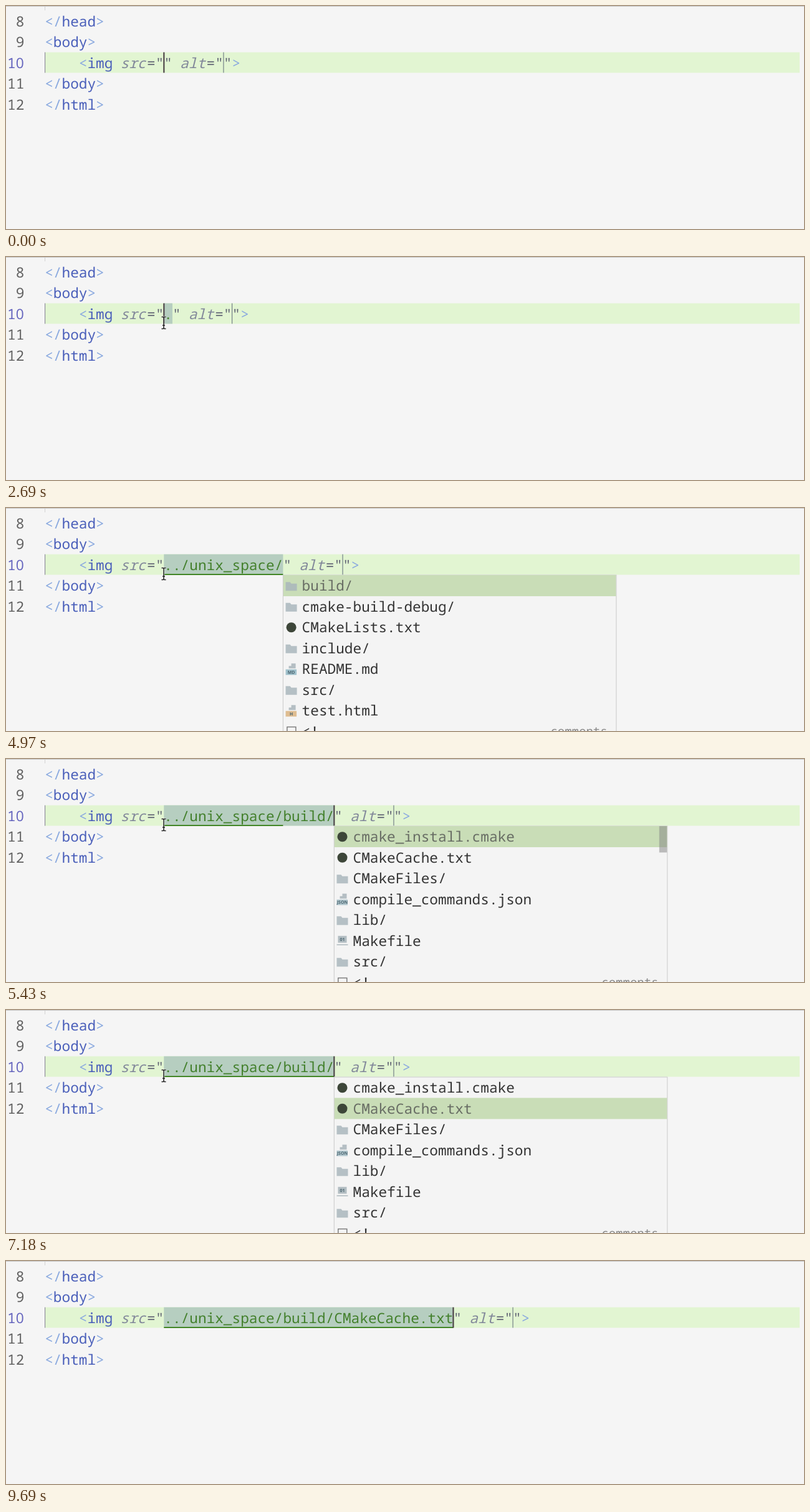
Write an HTML page that moves like this. It is 1280 px wide and 359 px high and loops after 9750 ms.

```html
<!DOCTYPE html>
<html lang="en">
<head>
<meta charset="utf-8">
<title>Path completion</title>
<style>
  html, body { margin: 0; width: 100%; height: 100%; overflow: hidden; background: #f5f5f5; }
  svg { display: block; width: 1280px; height: 359px; }
  text { font: 22.75px "Noto Sans Mono", monospace; white-space: pre; text-rendering: geometricPrecision; }
  .bracket { fill: #8aa9df; }
  .tag { fill: #4a5fba; }
  .attr { fill: #82889a; font-style: italic; }
  .mark { fill: #646876; }
  .path { fill: #43802c; }
  .number { fill: #626262; }
  .current { fill: #6363bd; }
  .zero { font-family: "Open Sans", sans-serif; }
  .item { fill: #343434; }
  .picked { fill: #686d64; }
  .hint { font-size: 19px; fill: #8a8a8a; }
  .badge { font: bold 7px "Open Sans", sans-serif; text-anchor: middle; fill: #4c6671; }
</style>
</head>
<body>
<svg id="stage" viewBox="0 0 1280 359"></svg>
<script>
const LOOP = 9750, COL = 13.65, ROW = 33.5, LEFT = 62.2, BASE = 32.8;
const LINE_TOP = 74.5, LINE_HEIGHT = 33, PATH_COL = 14;
const stage = document.getElementById('stage');
const colX = n => LEFT + n * COL;

function set(node, attrs) {
  for (const key in attrs) node.setAttribute(key, attrs[key]);
  return node;
}
function add(parent, name, attrs = {}, content = '') {
  const node = set(document.createElementNS('http://www.w3.org/2000/svg', name), attrs);
  node.textContent = content;
  return parent.appendChild(node);
}
const rect = (parent, x, y, width, height, fill) =>
  add(parent, 'rect', { x, y, width, height, fill });
const text = (parent, x, y, cls, content) =>
  add(parent, 'text', { x, y, class: cls }, content);
const show = (node, on) => { node.style.display = on ? '' : 'none'; };

// Line of code made of [class, string] pieces; slanted ones sit a little to the left
function codeLine(row, col, pieces) {
  const line = text(stage, colX(col), BASE + row * ROW);
  let shift = 0;
  for (const [cls, content] of pieces) {
    const wanted = cls === 'attr' ? -1.5 : 0;
    add(line, 'tspan', { class: cls, dx: wanted - shift }, content);
    shift = wanted;
  }
  return line;
}
const tagLine = (row, open, name) =>
  codeLine(row, 0, [['bracket', open], ['tag', name], ['bracket', '>']]);
const lineBar = (x, width, fill) => rect(stage, x, LINE_TOP, width, LINE_HEIGHT, fill);

// Editor
rect(stage, 0, 0, 1280, 1, '#c6c6c6');
rect(stage, 62, 1, 1, 6, '#d2d2d2');
lineBar(62, 1211, '#e2f5d2');
lineBar(62, 1.1, '#8b8798');
const selection = lineBar(colX(PATH_COL), 0, '#b6cec0');
const underline = rect(stage, colX(PATH_COL), 106, 0, 2, '#428626');

for (let row = 0; row < 5; row++) {
  const cls = row === 2 ? 'current' : 'number';
  [...String(row + 8).padStart(2)].forEach((digit, i) =>
    text(stage, 2 + COL * i, BASE + row * ROW, digit === '0' ? cls + ' zero' : cls, digit));
}
tagLine(0, '</', 'head');
tagLine(1, '<', 'body');
tagLine(3, '</', 'body');
tagLine(4, '</', 'html');
codeLine(2, 4, [['bracket', '<'], ['tag', 'img '], ['attr', 'src'], ['mark', '="']]);
const pathText = text(stage, colX(PATH_COL), BASE + 2 * ROW, 'path');
const tail = codeLine(2, PATH_COL, [['mark', '" '], ['attr', 'alt'], ['mark', '=""'], ['bracket', '>']]);
const altMark = lineBar(0, 1.2, '#748088');
const caret = lineBar(0, 2.1, '#493f45');

// Completion popups
function fileIcon(g, label, color) {
  add(g, 'path', { d: 'M9 -9h7v8H5v-4h4z', fill: '#b4bec3' });
  rect(g, 0, .5, 17.5, 9, color);
  text(g, 9, 7.6, 'badge', label);
}
function drawIcon(g, name) {
  if (name.endsWith('/'))
    add(g, 'path', { d: 'M0 -6h7l2 2.5h9V8H0z', fill: '#a9b6bc', 'fill-opacity': .85 });
  else if (/cmake/i.test(name)) add(g, 'circle', { cx: 9, cy: 0, r: 8, fill: '#3d4639' });
  else if (name.endsWith('.md')) fileIcon(g, 'MD', '#a0c1cc');
  else if (name.endsWith('.json')) fileIcon(g, 'JSON', '#b3c8cf');
  else if (name.endsWith('.html')) fileIcon(g, 'H', '#dfbd91');
  else {
    rect(g, 2, -8, 14, 11, '#b2bdc2');
    rect(g, 0, 5.5, 18, 1.6, '#b2bdc2');
    text(g, 9, .5, 'badge', '01');
  }
}

function popup(col, names) {
  const x = colX(col), width = 534.5, top = 108, long = names.length > 1;
  const group = add(stage, 'g');
  add(group, 'rect', { x, y: top, width, height: long ? 300 : ROW + 1, fill: '#f4f4f4', stroke: '#c9c9c9' });
  const bar = rect(group, x + .5, top, width - 1, ROW + .5, '#c9ddb7');
  const middle = i => top + ROW * (i + .5);
  const label = (name, i) => text(group, x + 30.2, middle(i) + 8.5, 'item', name);
  const labels = names.map((name, i) => {
    drawIcon(add(group, 'g', { transform: `translate(${x + 4.2} ${middle(i) + .5})` }), name);
    return label(name, i);
  });
  if (long) {
    add(group, 'rect', { x: x + 6.5, y: 352.5, width: 14, height: 14, fill: 'none', stroke: '#777', 'stroke-width': 1.4 });
    label('<!--', names.length);
    text(group, x + 429, 365.5, 'hint', 'comments');
  }
  const scroller = rect(group, x + 521.5, top, 12.3, 42.5, long ? 'rgba(130,130,130,.5)' : 'none');
  return {
    group, scroller,
    pick(index) {
      bar.setAttribute('y', top + ROW * index);
      labels.forEach((node, i) => node.classList.toggle('picked', i === index));
    }
  };
}

// Edits: three typed characters, then three accepted completions
const edits = [{ at: 0, path: '' }];
[...'../'].forEach((_, i) => edits.push({ at: 2690 + 210 * i, path: '../'.slice(0, i + 1) }));
edits[3].names = ['unix_space/'];
edits.push(
  { at: 3760, path: '../unix_space/', names: [
    'build/', 'cmake-build-debug/', 'CMakeLists.txt', 'include/', 'README.md', 'src/', 'test.html'] },
  { at: 5210, path: '../unix_space/build/', moveDown: 6910, names: [
    'cmake_install.cmake', 'CMakeCache.txt', 'CMakeFiles/', 'compile_commands.json', 'lib/', 'Makefile', 'src/'] },
  { at: 7420, path: '../unix_space/build/CMakeCache.txt' }
);
for (const edit of edits)
  if (edit.names) edit.popup = popup(PATH_COL + edit.path.length, edit.names);

// Mouse pointer
const mouse = add(stage, 'g');
const beam = 'M-3.5 -9.5h2.5l1 1l1 -1h2.5M0 -8.5v17M-3.5 9.5h2.5l1 -1l1 1h2.5M-2 4h4';
add(mouse, 'path', { d: beam, fill: 'none', stroke: '#fff', 'stroke-width': 3, 'stroke-opacity': .6 });
add(mouse, 'path', { d: beam, fill: 'none', stroke: '#222', 'stroke-width': 1.5 });

// Each glide follows a quadratic curve through its from, bend and to points
const glides = [
  { at: 20, until: 290, from: [940, 262], bend: [620, 115], to: [236, -12] },
  { at: 480, until: 610, from: [152, 0], bend: [210, 40], to: [267, 100] },
  { at: 760, until: 1180, from: [267, 100], bend: [282, 102], to: [260, 106] },
  { at: 1370, until: 1710, from: [260, 106], bend: [226, 113], to: [253, 106] },
  { at: 8410, until: 9310, from: [253, 106], bend: [1040, 135], to: [1094, 372] }
];

const clamp = v => Math.min(1, Math.max(0, v));
const latest = (list, t) => list.findLast(entry => entry.at <= t) || list[0];

function mouseAt(t) {
  const { at, until, from, bend, to } = latest(glides, t);
  const k = clamp((t - at) / (until - at)), r = 1 - k;
  return from.map((v, i) => r * r * v + 2 * r * k * bend[i] + k * k * to[i]);
}

// The caret shows after each action, then fades out and in by turns
const HALF = 660, FADE = 160, CLICK = 1600, RESTART = 9690;
const actions = [RESTART - LOOP, CLICK, ...edits.slice(1).map(e => e.at), RESTART];
function caretOpacity(t) {
  const age = t - actions.findLast(at => at <= t);
  if (age < HALF) return 1;
  const fade = clamp(age % HALF / FADE);
  return Math.floor(age / HALF) % 2 ? 1 - fade : fade;
}

const CHECK_DELAY = 1130;

function render(t) {
  const edit = latest(edits, t), { path, at } = edit;
  const before = edits[Math.max(0, edits.indexOf(edit) - 1)].path.length;
  const checked = latest(edits, t - CHECK_DELAY).path;
  const end = colX(PATH_COL + path.length);
  const glide = 1 - (1 - clamp((t - at - 15) / 90)) ** 3;
  const caretCol = before + (path.length - before) * glide;

  pathText.textContent = path;
  set(selection, { width: path.length * COL });
  set(underline, { width: checked.length > 3 ? checked.length * COL : 0 });
  set(tail, { x: end });
  set(altMark, { x: end + 7 * COL - .5 });
  set(caret, { x: colX(PATH_COL + caretCol) - 1, opacity: caretOpacity(t) });

  for (const entry of edits) {
    if (!entry.popup) continue;
    const age = t - entry.at;
    show(entry.popup.group, entry === edit);
    show(entry.popup.scroller, age > 20 && age < CHECK_DELAY);
    entry.popup.pick(t >= entry.moveDown ? 1 : 0);
  }

  show(mouse, t >= glides[0].at && t < glides.at(-1).until);
  set(mouse, { transform: `translate(${mouseAt(t).join(' ')})` });
}

const start = performance.now();
function tick() {
  render((performance.now() - start) % LOOP);
  requestAnimationFrame(tick);
}
tick();
</script>
</body>
</html>
```
